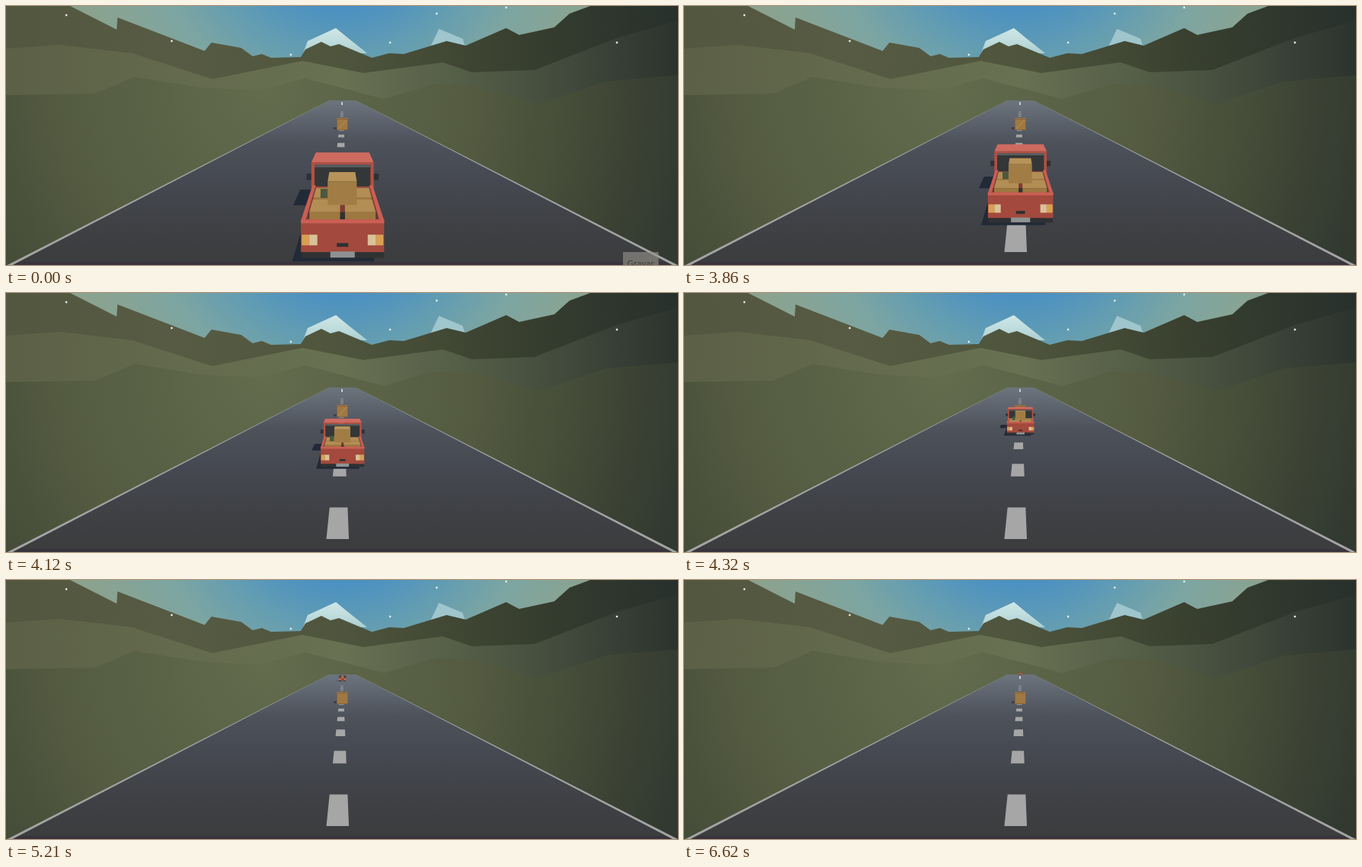
Animation, 880 px wide and 340 px high, one loop 6.69 s. Source, as an HTML page with a canvas:

```html
<!DOCTYPE html>
<html lang="pt">
<head>
<meta charset="utf-8">
<title>Road</title>
<style>
  html, body { margin: 0; height: 100%; overflow: hidden; background: #3a3c3e; }
  canvas { display: block; width: 880px; height: 340px; }
</style>
</head>
<body>
<canvas id="stage" width="880" height="340"></canvas>
<script>
const ctx = document.getElementById('stage').getContext('2d');
const W = 880, H = 340, LOOP = 6690, START = 3860;
const VX = 440.7, VY = 115.2;   // vanishing point
const GROUND = 220;             // camera height above the road

function poly(fill, points) {
  ctx.fillStyle = fill;
  ctx.beginPath();
  points.forEach(([x, y]) => ctx.lineTo(x, y));
  ctx.fill();
}

function rect(fill, x, y, w, h) {
  ctx.fillStyle = fill;
  ctx.fillRect(x, y, w, h);
}

// Colours are spread evenly over a gradient
function spread(gradient, colors) {
  colors.forEach((color, i) => gradient.addColorStop(i / (colors.length - 1), color));
  return gradient;
}
const linear = (x0, y0, x1, y1, ...colors) => spread(ctx.createLinearGradient(x0, y0, x1, y1), colors);
const radial = (x, y, r0, r1, ...colors) => spread(ctx.createRadialGradient(x, y, r0, x, y, r1), colors);

const paint = {
  sky: radial(440, -120, 120, 380, '#4a90c2', '#639db2', '#7ca5a2', '#87a495', '#8ca18b'),
  snow: linear(0, 28, 0, 66, '#cfe7e7', '#bfdcdd', '#a4cacd'),
  far: linear(0, 0, W, 0, '#53573f', '#575b43', '#4f553d', '#39402f', '#27302c'),
  mid: linear(0, 0, W, 0, '#5b6046', '#646a4d', '#687152', '#4c5542', '#2b332e'),
  near: radial(340, 110, 0, 560, '#636c4d', '#5b6347', '#535a40', '#434a37', '#323930'),
  road: linear(0, 124, 0, H, '#6c747d', '#4d525b', '#454850', '#3f4145', '#3b3c3d')
};

const ridge = (fill, ...points) => poly(fill, [[0, H], ...points, [W, H]]);

const flakes = [[79, 12], [217, 46], [373, 64], [503, 48], [564, 10], [655, 2], [800, 48]];

function drawLandscape() {
  rect(paint.sky, 0, 0, W, H);
  poly(paint.snow, [[389, 62], [395, 46], [432, 29], [449, 43], [473, 62]]);
  poly('#9fc6cd', [[556, 53], [567, 30], [598, 43], [601, 53]]);
  ridge(paint.far, [0, 0], [84, 0], [145, 31], [146, 15], [260, 59], [269, 48], [308, 55],
    [323, 66], [335, 63], [347, 68], [386, 67], [392, 57], [413, 47], [425, 53], [436, 50],
    [479, 68], [502, 62], [521, 63], [577, 46], [602, 52], [655, 29], [672, 38], [718, 28],
    [738, 10], [765, 0], [W, 0]);
  ridge(paint.mid, [0, 56], [70, 51], [165, 62], [270, 96], [388, 72], [468, 88], [572, 74],
    [610, 87], [692, 84], [800, 42], [W, 19]);
  ridge(paint.near, [0, 117], [117, 115], [168, 93], [255, 107], [330, 111], [392, 95],
    [495, 122], [560, 103], [610, 104], [697, 129], [785, 99], [W, 91]);
  flakes.forEach(([x, y]) => rect('#e3eeec', x - 1.2, y - 1.2, 2.4, 2.4));
}

// A piece of road between two slopes, from screen height top to bottom
function strip(fill, left, right, top, bottom) {
  const at = (slope, y) => [VX + slope * (y - VY), y];
  poly(fill, [at(left, top), at(right, top), at(right, bottom), at(left, bottom)]);
}

function drawRoad() {
  strip(paint.road, -1.94, 1.94, 124, H);
  strip('#39343b', -1.94, 1.94, 336, H);
  strip('#a3a4a4', -1.952, -1.922, 124, H);
  strip('#a3a4a4', 1.922, 1.952, 124, H);
  for (let i = 0; i < 13; i++) {
    const depth = .00481 + .00316 * i;
    strip('#a6a6a6', -.102, .04, VY + 1 / (depth + .0012), VY + 1 / depth);
  }
  rect('#c3cccc', 439, 126, 2, 4);
}

function drawCrate(passed) {
  rect('#3c424d', 429, 159, 4, 3);
  rect('#9f7843', 433, 147, 15, 16);
  ctx.strokeStyle = '#86623a';
  ctx.strokeRect(433.5, 148.5, 14, 14);
  if (passed) return;
  ctx.strokeStyle = '#c08f52';
  ctx.beginPath();
  ctx.moveTo(435, 161);
  ctx.lineTo(446, 150);
  ctx.stroke();
}

// The truck is built of blocks in space; its tailgate is at depth 1 when parked.
function drawTruck(z) {
  const at = (x, y, depth) => [VX + x / (depth + z - 1), VY + y / (depth + z - 1)];
  const slab = (fill, x0, x1, y, near, far) =>
    poly(fill, [at(x0, y, near), at(x1, y, near), at(x1, y, far), at(x0, y, far)]);
  const panel = (fill, x0, x1, y0, y1, depth) =>
    poly(fill, [at(x0, y0, depth), at(x1, y0, depth), at(x1, y1, depth), at(x0, y1, depth)]);
  const block = (top, back, x0, x1, y0, y1, near, far) => {
    slab(top, x0, x1, y0, near, far);
    panel(back, x0, x1, y0, y1, near);
  };
  const pair = (part, fill, x0, x1, ...rest) => {
    part(fill, -x1, -x0, ...rest);
    part(fill, x0, x1, ...rest);
  };
  const CAB = 1.42, red = '#a3493d', light = '#cb5f53', dark = '#2f3132';

  slab('#222a38', -66, 42, GROUND, 1, 1.6);
  slab('#222a38', -97, 0, GROUND, 1.5, 1.75);

  pair(panel, dark, 57, 67, 149, 161, CAB);
  block('#cf6a60', '#b54f43', -58, 58, 128, 178, CAB, 1.66);
  panel('#343737', -52, 52, 132, 173, CAB);
  panel('#5a5d5e', -52, 52, 132, 137, CAB);

  slab('#7d3b34', -52, 52, 172, 1, 1.4);
  panel(dark, -48, 48, 168, 179, 1.08);
  for (const near of [1.23, 1.08]) {
    pair(slab, '#b28d54', 3.5, 47, 168, near, near + .13);
    pair(panel, '#9d7840', 3.5, 47, 168, 179, near);
  }
  panel('#4c583f', -36, -24, 156, 171, 1.25);
  block('#b79259', '#a17d45', -22, 21, 130, 165, 1.13, 1.265);
  pair(slab, light, 49, 55, 168, 1, 1.4);

  panel(red, -54.5, 54.5, 165, 208, 1);
  panel(light, -54.5, 54.5, 165, 170, 1);
  pair(panel, '#d9a054', 43.5, 53.5, 185, 199, 1);
  pair(panel, '#d9c299', 33, 43.5, 185, 199, 1);
  panel(dark, -7.5, 7.5, 196, 201, 1);
  panel(dark, -54, 54, 208, 215.5, 1);
  panel('#8f9293', -16, 16, 207, 215, 1);
}

// Depth of the departing truck, advancing about 15 times a second
function distance(time) {
  if (time < START) return 1;
  const step = 68.5, moved = Math.floor((time - START) / step) * step;
  return 1 + 26 / (1 + (1863 / (moved + 410)) ** 3);
}

function drawButton() {
  rect('rgba(150,148,140,.62)', 808, 323, 46.5, 17);
  ctx.fillStyle = '#3a3b3c';
  ctx.font = '11.3px "Open Sans", sans-serif';
  ctx.fillText('Gravar', 813.5, 341.5);
}

function draw(time) {
  const z = distance(time), passed = z > 4.6;
  drawLandscape();
  drawRoad();
  if (passed) drawTruck(z);
  drawCrate(passed);
  if (!passed) drawTruck(z);
  if (time < 70) drawButton();
}

const start = performance.now();
function tick() {
  draw((performance.now() - start) % LOOP);
  requestAnimationFrame(tick);
}
tick();
</script>
</body>
</html>
```
